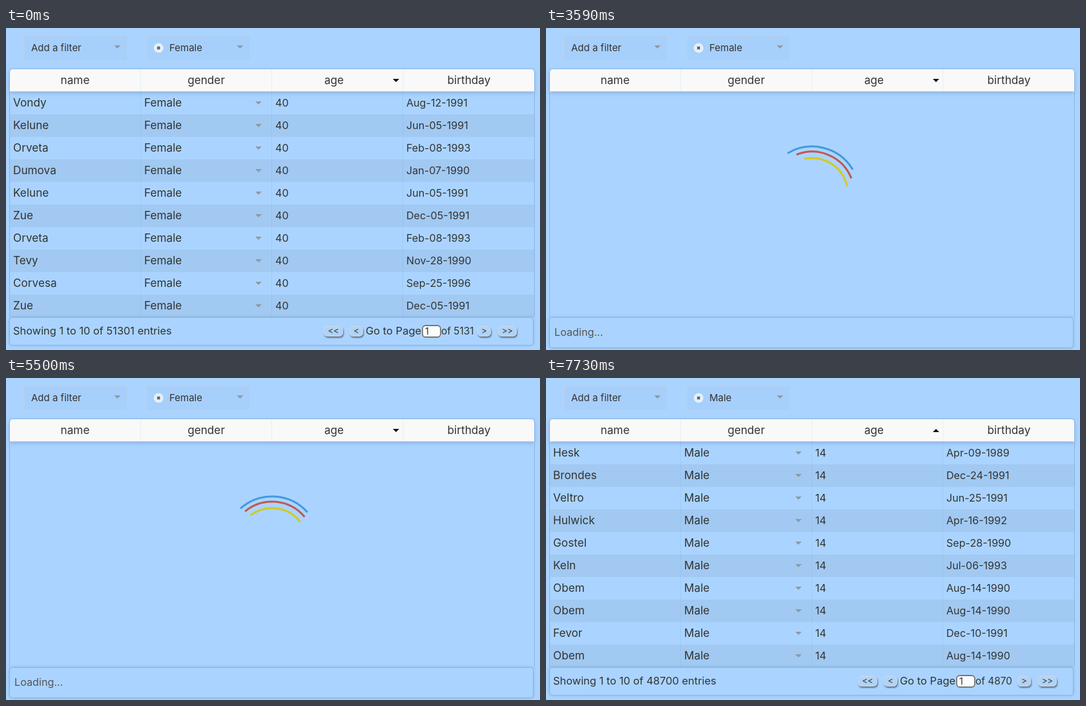
Recreate the animation shown at these times as an HTML page. Size 827 by 500 pixels, loop 8 s.

```html
<!DOCTYPE html>
<html lang="en">
<head>
<meta charset="utf-8">
<title>Filterable table</title>
<style>
  html, body { margin: 0; width: 100%; height: 100%; overflow: hidden; background: #aad4ff; }
  svg { display: block; width: 827px; height: 500px; }
  text { font-family: Inter, sans-serif; fill: #333; white-space: pre; }
  .head { filter: drop-shadow(0 2px 3px rgba(30, 60, 100, .28)); }
  .foot { filter: drop-shadow(0 0 2px rgba(30, 70, 120, .25)); }
  .btn { filter: drop-shadow(1px 2px 1px rgba(30, 40, 60, .6)); }
  .list { filter: drop-shadow(0 1px 1px rgba(0, 0, 0, .12)); }
</style>
</head>
<body>
<svg id="stage" viewBox="0 0 827 500"></svg>
<script>
const LOOP = 8000, BG = '#aad4ff', LINE = '#8bb5e0', GREY = '#8f9aa3';
const COLS = [208.5, 411.5, 614.5];
const stage = document.getElementById('stage');
const ctx = document.createElement('canvas').getContext('2d');

const people = list => list.trim().split(/\s*,\s*/).map(p => p.split(' '));

const women = people(`Kelune Jun-05-1991, Dumova Jan-07-1990, Kelune Jun-05-1991,
  Zue Dec-05-1991, Orveta Feb-08-1993, Tevy Nov-28-1990, Corvesa Sep-25-1996,
  Zue Dec-05-1991, Fensy Nov-20-1992, Sovie Aug-12-1991`);
const first = [['Vondy', 'Aug-12-1991'], women[0], women[4], ...women.slice(1, 8)];
const renamed = [['Nofe', 'Aug-12-1991'], ...women.slice(0, 9)];
const youngMen = people(`Hesk Apr-09-1989, Brondes Dec-24-1991, Veltro Jun-25-1991,
  Hulwick Apr-16-1992, Gostel Sep-28-1990, Keln Jul-06-1993, Obem Aug-14-1990,
  Obem Aug-14-1990, Fevor Dec-10-1991, Obem Aug-14-1990`);
const olderMen = [4, 2, 8, 0, 5, 3, 1, 6, 2, 8].map(i => youngMen[i]);

const text = (x, y, size, str, extra = '') =>
  `<text x="${x}" y="${y}" font-size="${size}" ${extra}>${str.replace(/</g, '&lt;')}</text>`;

const rect = (x, y, w, h, fill, extra = '') =>
  `<rect x="${x}" y="${y}" width="${w}" height="${h}" fill="${fill}" ${extra}/>`;

const line = (x1, y1, x2, y2, color) =>
  `<path d="M${x1} ${y1}L${x2} ${y2}" stroke="${color}"/>`;

// Triangle of width 10 and height 5 whose box is centred on (x, y)
function arrow(x, y, up, color = GREY) {
  const d = up ? -2.5 : 2.5;
  return `<path d="M${x - 5} ${y - d}h10L${x} ${y + d}z" fill="${color}"/>`;
}

function filterBox(x, label, textX, up) {
  return rect(x + .5, 12.5, 159, 37, '#a7cffb', 'stroke="#ccc" stroke-opacity=".5"') +
    text(textX, 36, 15, label) + arrow(x + 144.5, 29.5, up);
}

function filters(gender, open) {
  return filterBox(28, 'Add a filter', 39, false) + filterBox(218, gender, 253, open) +
    '<circle cx="236.3" cy="31" r="7.5" fill="#e4f0fa"/>' +
    '<path d="M234.3 29l4 4m0-4l-4 4" stroke="#555" stroke-width="1.8"/>';
}

function header(up) {
  const titles = [['name', 107], ['gender', 310], ['age', 508], ['birthday', 717]];
  return '<path class="head" d="M6 98.5V69q0-5 5-5h802q5 0 5 5v29.500z" fill="#f9f9f9"/>' +
    `<path d="M5.500 98V69q0-5.500 5.500-5.500h802q5.500 0 5.500 5.500v29" fill="none" stroke="${LINE}" stroke-opacity=".7"/>` +
    COLS.map(x => line(x, 64, x, 98, '#e3f1f1')).join('') +
    titles.map(([s, x]) => text(x, 87, 17.2, s, 'text-anchor="middle"')).join('') +
    arrow(604, 81.5, up, '#111');
}

function rows(s) {
  const out = s.rows.map(([name, date], i) => {
    const y = 99 + 35 * i, base = y + 23;
    return (i % 2 ? rect(6, y, 812, 35, '#a1c9f2') : '') +
      (i === 0 && s.edit ? '' : text(11, base, 17.2, name)) +
      text(214, base, 17.2, s.gender) + arrow(391, y + 17.5, i === 0 && s.cell) +
      text(417, base, 16.2, String(s.age)) + text(620, base, 16.1, date);
  });
  return out.join('') + COLS.map(x => line(x, 99, x, 449, 'rgba(130,180,225,.3)')).join('');
}

function nameInput(value, selected) {
  ctx.font = '14.6px Inter, sans-serif';
  const w = ctx.measureText(value).width;
  return rect(11, 106, 192, 24, '#fff', 'rx="2" stroke="#76a9ee" stroke-width="2"') +
    (selected ? rect(12, 109, w, 18, '#3390ff') : rect(Math.round(12 + w), 109, 1, 18, '#000')) +
    text(12, 123, 14.6, value, selected ? 'style="fill:#fff"' : '');
}

function optionList(x, y, w, hover) {
  const opts = ['all', 'Male', 'Female'].map((s, i) =>
    (i === hover ? rect(x + 1, y + 36 * i, w - 2, 36, '#f2f9fc') : '') +
    text(x + 11, y + 23 + 36 * i, 15, s, i === hover ? '' : 'style="fill:#666"'));
  return rect(x + .5, y - .5, w - 1, 109, '#fff', 'class="list" stroke="#ccc"') + opts.join('');
}

function button(x, w, label) {
  return rect(x + .5, 463.5, w - 2, 15, '#b0d3f5', 'class="btn" rx="5" stroke="#d0dce7"') +
    text(x + w / 2 - .5, 475, 13, label, 'text-anchor="middle"');
}

const footBox = h => rect(5.5, 449.5, 811, h, BG, `class="foot" rx="4" stroke="${LINE}"`);

function footer(s) {
  const dx = s.dx;
  return footBox(43) +
    text(11, 476, 16.4, `Showing 1 to 10 of ${s.total} entries`) +
    button(492 + dx, 31, '<<') + button(532 + dx, 22, '<') +
    text(557 + dx, 476, 16.5, 'Go to Page') +
    rect(645 + dx, 462, 28, 18, s.dim ? '#e9eff8' : '#fbfcfd', 'rx="5" stroke="#777" stroke-width="1.8"') +
    text(649 + dx, 476, 14.6, '1') +
    text(674 + dx, 476, 15.4, `of ${s.pages}`) +
    button(730, 22, '>') + button(762, 30, '>>');
}

// Nested rings: each inner one adds its own spin to the outer one
function spinner(ms) {
  const rings = [[73.5, .18, '#4499dc'], [65.5, .3, '#c4574c'], [55.5, .42, '#d3c91f']];
  return rings.map(([r, speed, color]) => {
    const a = r * Math.SQRT1_2;
    return `<path transform="translate(412 257.500) rotate(${(speed * ms).toFixed(2)})" ` +
      `d="M${-a} ${-a}A${r} ${r} 0 0 1 ${a} ${-a}" fill="none" stroke="${color}" stroke-width="3"/>`;
  }).join('');
}

function loading(elapsed) {
  const shown = elapsed < 60 ? 0 : 60 + 46 * Math.floor((elapsed - 60) / 46);
  return spinner(18 + shown) + footBox(47) + text(13, 478, 16.2, 'Loading...', 'style="fill:#555"');
}

const initial = { rows: first, gender: 'Female', age: 40, total: 51301, pages: 5131, dx: 0 };
const steps = [
  [0, initial],
  [1240, { edit: 'Vondy' }],
  [1320, { selected: true }],
  [2250, { edit: 'N', selected: false }],
  [2580, { edit: 'No' }],
  [2760, { edit: 'Nof' }],
  [2900, { edit: 'Nofe' }],
  [3490, { edit: '', loadFrom: 3490 }],
  [3870, { loadFrom: 0, rows: renamed, dim: true }],
  [4390, { cell: true, hover: -1 }],
  [4770, { hover: 1 }],
  [5500, { cell: false, loadFrom: 5500 }],
  [5880, { loadFrom: 0, rows: women, total: 51300, pages: 5130, dx: -6, dim: false }],
  [6260, { menu: true, hover: -1 }],
  [6580, { hover: 0 }],
  [6680, { hover: 1 }],
  [7060, { menu: false, rows: olderMen, gender: 'Male', total: 48700, pages: 4870, dx: -9 }],
  [7730, { rows: youngMen, age: 14, up: true }],
];

function scene(t) {
  const s = Object.assign({}, ...steps.filter(([at]) => at <= t).map(([, change]) => change));
  return filters(s.gender, s.menu) +
    (s.loadFrom ? loading(t - s.loadFrom) : rows(s) + footer(s)) +
    line(5.5, 99, 5.5, 449, LINE) + line(818.5, 99, 818.5, 449, LINE) +
    header(s.up) +
    (s.edit ? nameInput(s.edit, s.selected) : '') +
    (s.cell ? optionList(215, 134, 191, s.hover) : '') +
    (s.menu ? optionList(218, 50, 160, s.hover) : '');
}

let last = '';
const start = performance.now();
function tick() {
  const markup = scene((performance.now() - start) % LOOP);
  if (markup !== last) stage.innerHTML = last = markup;
  requestAnimationFrame(tick);
}
tick();
</script>
</body>
</html>
```
